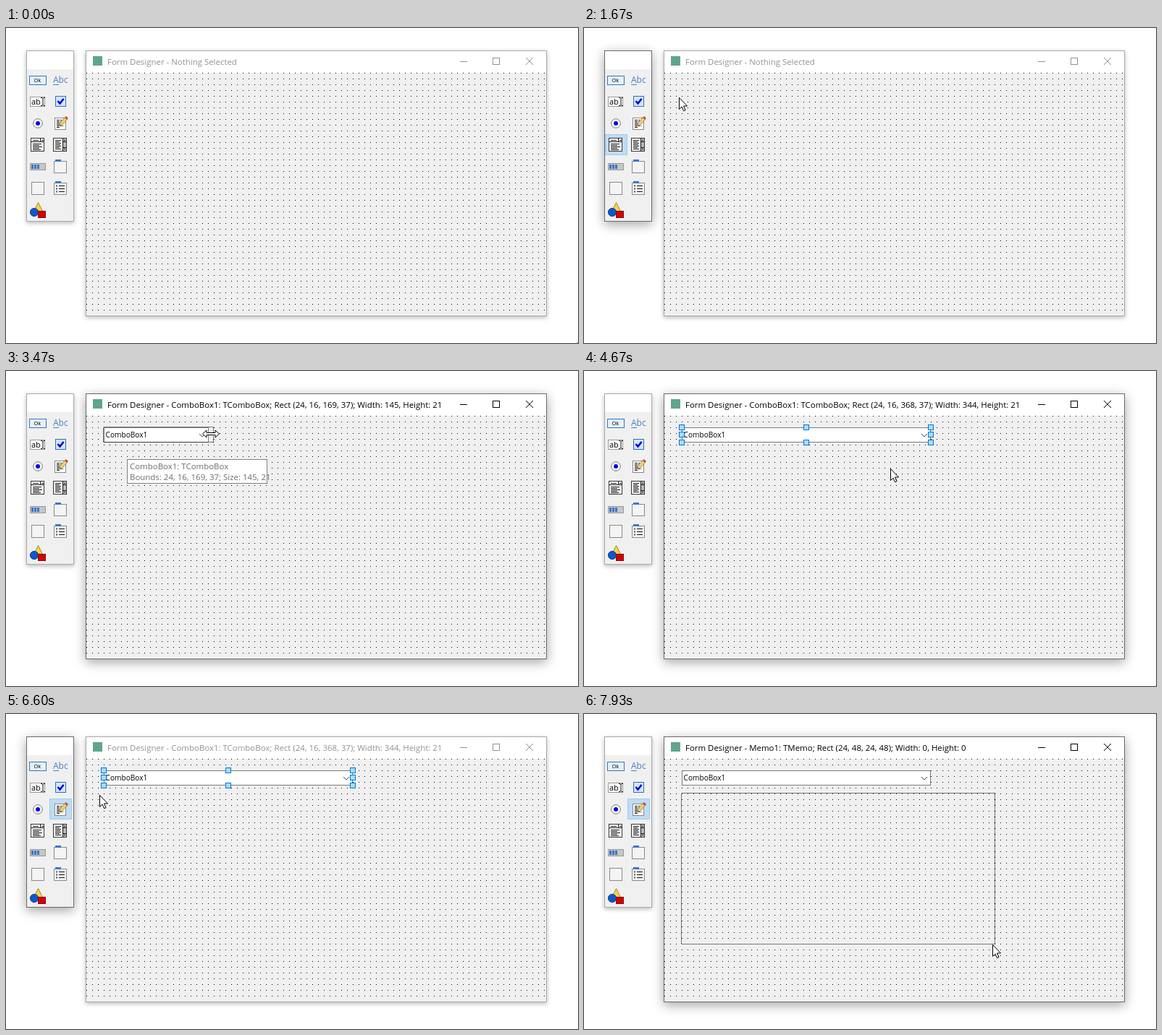
Recreate the animation shown at these times as an HTML page. Size 790 by 436 pixels, loop 8000 ms.

```html
<!DOCTYPE html>
<html lang="en">
<head>
<meta charset="utf-8">
<title>Form Designer</title>
<style>
html, body { margin: 0; width: 790px; height: 436px; overflow: hidden; background: #fff; }
.win { position: absolute; box-sizing: border-box; top: 31px; background: #f0f0f0; border: 1px solid #aaa; box-shadow: 0 2px 6px rgba(0,0,0,.28); }
.win.active { border-color: #6a6a6a; box-shadow: 0 4px 15px rgba(0,0,0,.36); }
.win::before { content: ""; display: block; background: #fff; }
#palette { left: 28px; width: 66px; height: 237px; }
#palette::before { height: 25px; }
#form { left: 110px; width: 637px; height: 368px; }
#form::before { height: 30px; }
svg { position: absolute; left: 0; top: 0; font: 11.45px "Open Sans", "Noto Sans", sans-serif; }
.crisp, .crisp * { shape-rendering: crispEdges; }
.box { fill: #f4f4f4; stroke: #8a8a8a; }
.page { fill: #fff; stroke: #333; }
.ink { fill: none; stroke: #111; }
.tab { fill: #3a78c8; }
#caption { color: #929292; }
#caption.active { color: #000; }
#caption text { fill: currentColor; }
#caption path { fill: none; stroke: currentColor; }
#rubber { fill: none; stroke: #000; stroke-dasharray: 1 1; }
#handles rect { fill: #a8dcf5; stroke: #0078d7; }
#hint text { fill: #6e6e6e; }
.cursor { fill: #fff; stroke: #000; }
</style>
</head>
<body>
<div id="palette" class="win"></div>
<div id="form" class="win"></div>
<svg width="790" height="436">
  <defs>
    <pattern id="grid" x="111" y="62" width="8" height="8" patternUnits="userSpaceOnUse">
      <rect width="1" height="1" shape-rendering="crispEdges"/>
    </pattern>
  </defs>
  <rect x="111" y="62" width="635" height="336" fill="url(#grid)"/>

  <rect x="120" y="39" width="13" height="13" fill="#5fa58c"/>
  <g id="caption">
    <text id="title" x="140" y="51"></text>
    <path class="crisp" d="M627 46.5h10M672.5 41.5h9v9h-9z"/>
    <path d="M718 41l10 10M728 41l-10 10"/>
  </g>

  <g class="crisp">
    <rect id="picked" width="30" height="28" fill="#bfdcf3" stroke="#9fcbee"/>
    <rect id="hover" width="30" height="28" fill="#d9e8f2" stroke="#cfe2ef"/>
  </g>

  <g id="icons">
    <rect x="32.5" y="66.5" width="23" height="12" fill="#e6f0fa" stroke="#3377bd"/>
    <text x="38.5" y="75" font-size="7.5">Ok</text>
    <text x="65" y="76" font-size="12" fill="#4a7fc4">Abc</text>
    <path d="M65 78.5h8" stroke="#4a7fc4"/>
    <rect class="crisp" x="33.5" y="95.5" width="20" height="13" fill="#fff" stroke="#999"/>
    <text x="35" y="106" font-size="11">ab</text>
    <path class="ink" d="M48 96.5h2l1 1 1-1h2M51 97v10M48 107.5h2l1-1 1 1h2"/>
    <rect x="68.5" y="94.5" width="14" height="14" fill="#d3e6f8" stroke="#2c70b8"/>
    <path d="M71.5 101l3 3.5 5-6.5" fill="none" stroke="#0000d8" stroke-width="2.6"/>
    <circle cx="44" cy="132" r="6.3" fill="#fff" stroke="#777"/>
    <circle cx="44" cy="132" r="3" fill="#0000e6"/>
    <g class="crisp">
      <rect x="67.5" y="124.5" width="15" height="16" fill="#fff" stroke="#888"/>
      <path class="ink" stroke-dasharray="4 1 2 1" d="M70 127.5h9M70 129.5h6M70 131.5h8M70 133.5h6M70 135.5h9M70 137.5h5"/>
    </g>
    <path d="M74 135l1-4 7-8 3 3-7 8z" fill="#efd071" stroke="#8b7740" stroke-width=".8"/>
    <path d="M81 124l2-2 3 3-2 2z" fill="#c34f41"/>
    <g class="crisp">
      <rect class="page" x="34.5" y="152.5" width="18" height="18"/>
      <path class="ink" d="M35 157.5h17M47.5 153v4M49 155.5h3M37 155.5h8M37 160.5h12M37 162.5h9M37 164.5h13M37 166.5h9M37 168.5h11"/>
      <rect class="page" x="65.5" y="152.5" width="18" height="18"/>
      <path class="ink" d="M78.5 153v17M68 155.5h8M68 157.5h6M68 159.5h8M68 161.5h7M68 163.5h8M68 165.5h6M68 167.5h8"/>
      <path d="M79 153h4v17h-4z" fill="#bbb"/>
      <path class="ink" d="M79 157.5h4M79 165.5h4M80 155.5h2M80 167.5h2"/>
      <rect x="33.5" y="187.5" width="21" height="9" fill="#c6c6c6" stroke="#999"/>
      <path class="tab" d="M35 189h3v6h-3zM39 189h3v6h-3zM43 189h3v6h-3z"/>
      <rect class="box" x="66.5" y="184.5" width="17" height="16"/>
      <path class="tab" d="M68 182h8v3h-8z"/>
      <rect class="box" x="35.5" y="213.5" width="17" height="17"/>
      <rect class="box" x="66.5" y="214.5" width="17" height="16"/>
      <path class="tab" d="M68 212h8v3h-8z"/>
      <path class="ink" d="M73 218.5h8M73 222.5h8M73 226.5h8"/>
    </g>
    <path d="M69 218.5h2M69 222.5h2M69 226.5h2" stroke="#555" stroke-width="2"/>
    <path d="M44.5 241.5l7 14h-14z" fill="#f5d34e" stroke="#a08a30"/>
    <circle cx="39" cy="255" r="5.6" fill="#0b57d0" stroke="#17407f"/>
    <rect x="44.5" y="253.5" width="10" height="9" fill="#d50000" stroke="#7a1010"/>
  </g>

  <g id="combo">
    <rect id="field" class="crisp" x="135.5" y="78.5" height="20" fill="#fff" stroke="#7a7a7a"/>
    <text x="137.5" y="92" font-size="10.15">ComboBox1</text>
    <path id="arrow" d="M-4-2L0 2 4-2" fill="none" stroke="#444"/>
  </g>
  <g id="handles" class="crisp"></g>
  <rect id="rubber" class="crisp"/>
  <g id="hint">
    <rect class="crisp" x="167.5" y="122.5" width="193" height="33" fill="#fff" stroke="#808080"/>
    <text x="171" y="136">ComboBox1: TComboBox</text>
    <text x="171" y="151">Bounds: 24, 16, 169, 37; Size: 145, 21</text>
  </g>
  <path id="pointer" class="cursor" d="M.5.5V16.5L4 13 6.6 18.7 9 17.7 6.5 12H11.5Z"/>
  <path id="sizer" class="cursor" d="M-11.5 0L-6-5V-1.5H6V-5L11.5 0 6 5V1.5H-6V5Z"/>
</svg>
<script>
const LOOP = 8000, TICK = 200 / 3;   // 15 ticks a second
const LEFT = 111, TOP = 62, GRID = 8;

// pointer way points: tick, x, y
const path = [
  [0, 789, 435], [6, 400, 290], [11, 112, 174], [13, 75, 182], [17, 47, 163], [18, 47, 163],
  [25, 131, 96], [29, 135, 80], [30, 135, 80], [43, 167, 97], [49, 279, 87], [51, 279, 87],
  [63, 476, 88], [66, 476, 88], [70, 423, 135], [79, 52, 188], [87, 69, 135], [90, 72, 133],
  [92, 72, 133], [99, 129, 112], [103, 135, 110], [106, 135, 110], [116, 565, 319],
  [118, 565, 319], [119, 564, 319]
];

const $ = id => document.getElementById(id);
const set = (id, attrs) => { for (const a in attrs) $(id).setAttribute(a, attrs[a]); };
const show = (id, on) => { $(id).style.display = on ? "" : "none"; };
const clamp = v => Math.min(1, Math.max(0, v));
const snap = (v, origin) => origin + Math.round((v - origin) / GRID) * GRID;

function slope(i, axis) {
  const a = path[i], b = path[i + 1];
  return a && b ? (b[axis] - a[axis]) / (b[0] - a[0]) : 0;
}

// monotone tangent: rests at pauses and turning points
function tangent(i, axis) {
  const a = slope(i - 1, axis), b = slope(i, axis);
  return a * b > 0 ? 2 * a * b / (a + b) : 0;
}

function place(k, axis) {
  let i = 0;
  while (i < path.length - 2 && path[i + 1][0] <= k) i++;
  const p = path[i], q = path[i + 1], d = q[0] - p[0], u = (k - p[0]) / d, v = 1 - u;
  return Math.round(
    p[axis] * v * v * (1 + 2 * u) + q[axis] * u * u * (3 - 2 * u) +
    d * u * v * (tangent(i, axis) * v - tangent(i + 1, axis) * u));
}

function cell(id, spot) {
  show(id, spot);
  if (spot) set(id, { x: 29.5 + 31 * spot[0], y: 57.5 + 30 * spot[1] });
}

function caption(k) {
  if (k < 31) return "Nothing Selected";
  if (k < 67) return "ComboBox1: TComboBox; Rect (24, 16, 169, 37); Width: 145, Height: 21";
  if (k < 104) return "ComboBox1: TComboBox; Rect (24, 16, 368, 37); Width: 344, Height: 21";
  return "Memo1: TMemo; Rect (24, 48, 24, 48); Width: 0, Height: 0";
}

function drawHandles(width) {
  let out = "";
  for (const x of [0, width >> 1, width])
    for (const y of [78, 88, 99])
      if (y !== 88 || x === 0 || x === width)
        out += `<rect x="${131.5 + x}" y="${y - 3.5}" width="7" height="7"/>`;
  $("handles").innerHTML = out;
}

function draw(k) {
  const x = place(k, 1), y = place(k, 2);
  const formOn = k >= 31 && k < 90 || k >= 104;
  const paletteOn = k >= 19 && k < 31 || k >= 90 && k < 104;
  const sizing = k >= 52 && k < 67, drawing = k >= 107;
  const width = k < 67 ? 145 : 344;

  $("form").classList.toggle("active", formOn);
  $("caption").classList.toggle("active", formOn);
  $("palette").classList.toggle("active", paletteOn);
  $("title").textContent = "Form Designer - " + caption(k);

  const inside = x >= 29 && x < 92 && y >= 57 && y < 267;
  const picked = k >= 90 ? [1, 2] : k >= 19 && k < 31 ? [0, 3] : null;
  const over = inside ? [x < 60 ? 0 : 1, Math.floor((y - 57) / 30)] : null;
  cell("picked", picked);
  cell("hover", over && String(over) !== String(picked) ? over : null);

  show("combo", k >= 31);
  set("field", { width: width - 1 });
  set("arrow", { transform: `translate(${135 + width - 9} 89)` });
  show("handles", k >= 31 && k < 104 && !sizing);
  drawHandles(width);

  show("rubber", sizing || drawing);
  if (sizing) set("rubber", { x: 134.5, y: 77.5, width: Math.max(145, snap(x, LEFT) - 135), height: 21 });
  if (drawing) set("rubber", { x: 134.5, y: 109.5, width: Math.max(0, snap(x, LEFT) - 134), height: Math.max(0, snap(y, TOP) - 109) });

  $("hint").style.opacity = k < 53 ? clamp((k - 43) / 4) : clamp((55 - k) / 3);

  const wide = k >= 49 && k < 68;
  show("sizer", wide);
  show("pointer", !wide);
  set(wide ? "sizer" : "pointer", { transform: `translate(${x} ${y})` });
}

let last = -1;
function frame(now) {
  const k = Math.floor((now % LOOP + 4) / TICK) % 120;
  if (k !== last) draw(last = k);
  requestAnimationFrame(frame);
}
frame(0);
</script>
</body>
</html>
```
